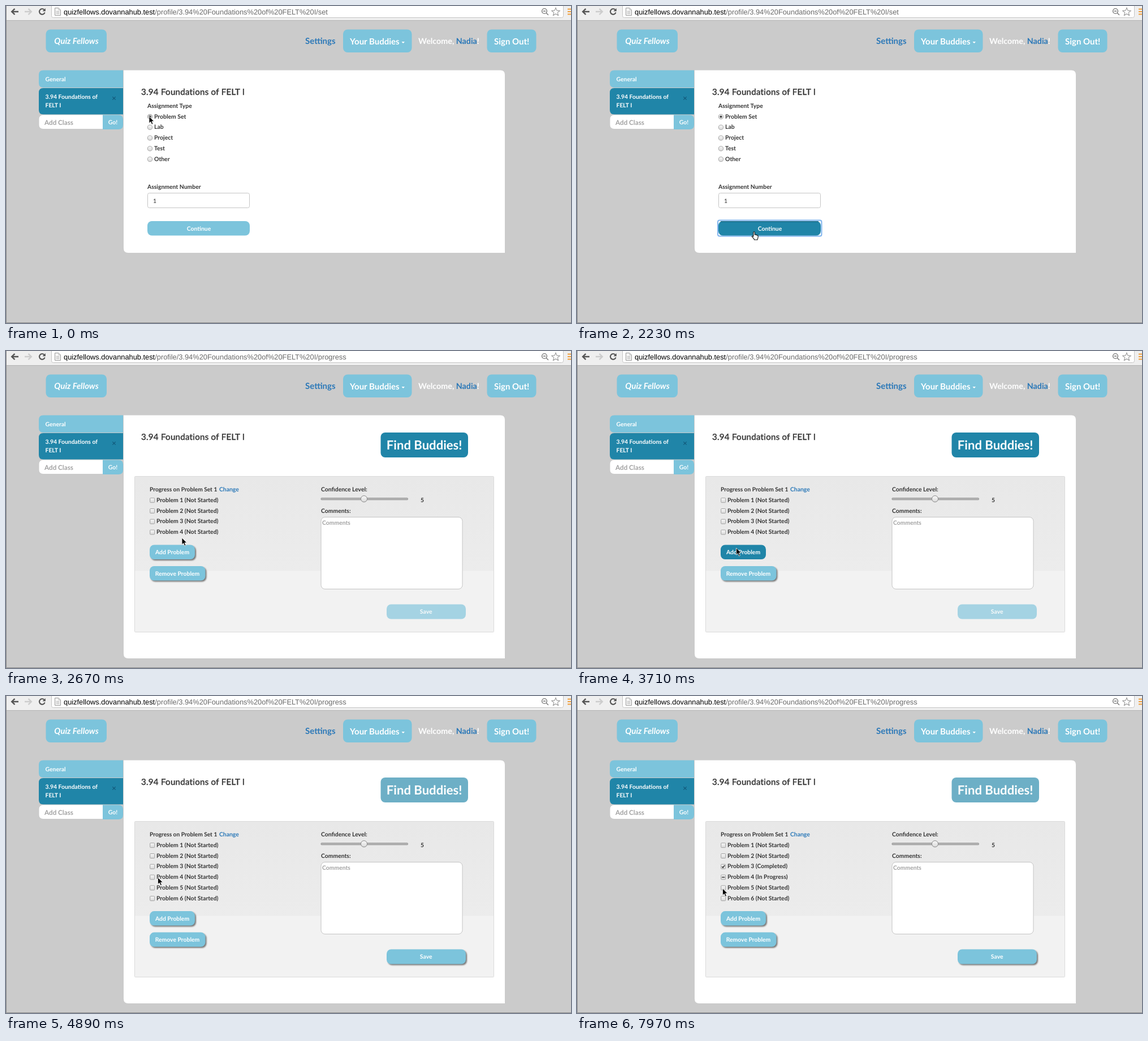
An HTML page for the animation above (8000 ms loop, 999x560 px).

```html
<!DOCTYPE html>
<html lang="en">
<head>
<meta charset="utf-8">
<title>Study planner</title>
<style>
  html, body { margin: 0; width: 100%; height: 100%; overflow: hidden; background: #cbcbcb; }
  svg { display: block; width: 999px; height: 560px; }
  text { font: 700 10.4px Lato, "Open Sans", sans-serif; fill: #333; text-rendering: geometricPrecision; white-space: pre; }
  .url { font: 12.83px "Liberation Sans", Arial, sans-serif; fill: #6a6a6a; }
  .url .host { fill: #000; }
  .nav text { font-size: 15px; }
  .nav .hello { font-size: 14.3px; }
  .nav .logo { font-size: 14.8px; font-style: italic; }
  .title { font-size: 15px; font-weight: 400; letter-spacing: .3px; stroke: #333; stroke-width: .45px; }
  .find text { font-size: 22.1px; }
  .heading { font-size: 10.2px; }
  .value { font-weight: 400; }
  .mid { text-anchor: middle; }
  .w, .w text { fill: #fff; }
  .link { fill: #2a78b8; }
  .hint { fill: #a2a2a2; }
  .light { fill: #7cc4dc; }
  .dark, .hot .light { fill: #2085a8; }
  .field { fill: #fff; stroke: #c4c4c4; }
  .lift { filter: drop-shadow(2.5px 2.5px 1px rgba(0, 0, 0, .5)); }
  .off { opacity: .65; }

  .loading-only, .progress-only, .stop, .hand, .ring { display: none; }
  .loading .loading-only, .progress .progress-only, .stopping .stop,
  .pointing .hand, .pressing .ring { display: inline; }
  .progress .form, .loading .continue, .stopping .reload, .pointing .arrow { display: none; }
  .loading .content { transform: translateY(40px); }
  .loading .links { transform: translateX(-5.7px); }
  .loading .sign rect { x: 845px; width: 92.5px; }
  .loading .sign text { transform: translateX(-3px); }
</style>
</head>
<body>
<svg id="stage" viewBox="0 0 999 560">
  <defs>
    <linearGradient id="knob" x2="0" y2="1"><stop stop-color="#f8f8f8"/><stop offset="1" stop-color="#d9d9d9"/></linearGradient>
    <linearGradient id="band" x2="0" y2="1"><stop stop-color="#e8e8e8"/><stop offset="1" stop-color="#ececec"/></linearGradient>
  </defs>
  <rect width="999" height="560" fill="#cbcbcb"/>

  <!-- browser bar -->
  <rect width="999" height="25" fill="#efefef"/>
  <path d="M0 25.5H999" stroke="#b5b5b5"/>
  <rect x="80.5" y="-9.5" width="905" height="30" rx="3" class="field"/>
  <g fill="none" stroke="#555" stroke-width="2.4">
    <path d="M22 10H11M15.5 4.8L10.2 10 15.5 15.2"/>
    <path d="M33 10H44M39.5 4.8L44.8 10 39.5 15.2" stroke="#cdcdcd"/>
    <g class="reload">
      <path d="M67.6 6.7A4.9 4.9 0 1 0 68.6 11.4" stroke-width="2.1"/>
      <path d="M69.8 4V9.3H64.5Z" fill="#555" stroke="none"/>
    </g>
    <path class="stop" d="M59.5 5.5L68.5 14.5M68.5 5.5L59.5 14.5"/>
    <g stroke="#999" stroke-width="1">
      <path d="M86.5 3.5H93L96.5 7V16.5H86.5Z" fill="#f6f6f6"/>
      <path d="M93 3.5V7H96.5M88.5 9.5H94.5M88.5 11.5H94.5M88.5 13.5H94.5" stroke="#bbb"/>
    </g>
    <g stroke="#777" stroke-width="1.4">
      <circle cx="952" cy="9" r="4.4"/>
      <path d="M949.8 9H954.2M955.2 12.2L959 16"/>
      <path d="M972 3.2L974 7.9 979.2 8.4 975.3 11.7 976.5 16.6 972 14 967.5 16.6 968.7 11.7 964.8 8.4 970 7.9Z" stroke="#999" stroke-width="1.1"/>
    </g>
    <path d="M993 5.5H999M993 10H999M993 14.5H999" stroke="#f2a03c" stroke-width="2.2"/>
  </g>
  <text class="url" x="102" y="15"><tspan class="host">quizfellows.dovannahub.test</tspan>/profile/3.94%20Foundations%20of%20FELT%20I/<tspan id="path">set</tspan></text>
  <path d="M.5 0V559.5H999" fill="none" stroke="#8a8a8a"/>

  <g class="nav">
    <rect class="light" x="70.5" y="41.5" width="107.5" height="40.5" rx="8"/>
    <text class="logo w mid" x="124.5" y="67">Quiz Fellows</text>
    <g class="links">
      <text class="link" x="529" y="67">Settings</text>
      <rect class="light" x="596" y="41.5" width="121.5" height="40.5" rx="8"/>
      <text class="w" x="608" y="68">Your Buddies</text>
      <path d="M699.5 63H705L702.2 66Z" fill="#fff"/>
      <text class="hello w" x="729" y="67">Welcome, <tspan class="link">Nadia</tspan>!</text>
    </g>
    <g class="sign">
      <rect class="light" x="850.5" y="41.5" width="87" height="40.5" rx="8"/>
      <text class="w" x="863" y="68">Sign Out!</text>
    </g>
    <g class="loading-only off">
      <rect class="light" x="845" y="82" width="92.5" height="40.5" rx="8"/>
      <text class="w dots" x="857" y="108"></text>
    </g>
  </g>

  <g class="content">
    <!-- sidebar -->
    <path class="light" d="M207 113.5V144H66Q58 144 58 136V121.5Q58 113.5 66 113.5Z"/>
    <text class="w" x="69.5" y="132.5">General</text>
    <path class="dark" d="M207 145V191.5H66Q58 191.5 58 183.5V153Q58 145 66 145Z"/>
    <text class="w" x="69.5" y="164">3.94 Foundations of</text>
    <text class="w" x="69.5" y="179">FELT I</text>
    <path d="M188.3 160.3L193.7 165.7M193.7 160.3L188.3 165.7" stroke="#12597a" stroke-width="1.2"/>
    <path d="M171 192.5V217H66Q58.5 217 58.5 210V200Q58.5 192.5 66 192.5Z" fill="#fff"/>
    <text class="hint" x="68" y="209.5" style="font-size:11.7px">Add Class</text>
    <path class="light" d="M171 192.5H199Q207 192.5 207 200.5V210Q207 218 199 218H171Z"/>
    <text class="w mid" x="189" y="208.5">Go!</text>

    <path id="panel" fill="#fff"/>
    <text class="title" x="239" y="157">3.94 Foundations of FELT I</text>

    <g class="form">
      <text x="250" y="179.5">Assignment Type</text>
      <g id="radios"></g>
      <text x="250" y="323">Assignment Number</text>
      <rect class="field" x="250.5" y="330.5" width="180" height="26" rx="3"/>
      <text class="value" x="260" y="347.5">1</text>
      <g class="continue" id="continue">
        <rect class="ring" x="249" y="378.5" width="183.5" height="28" rx="3" fill="#fff" stroke="#7fb4ee" stroke-width="2"/>
        <rect class="light" x="250" y="380" width="181" height="25.5" rx="8"/>
        <path class="ring" d="M254 381Q256 380.7 258 380.7H423Q425 380.7 427 381" fill="none" stroke="#186a87" stroke-width="1.6"/>
        <text class="w mid" x="341" y="396.5">Continue</text>
      </g>
      <g class="loading-only">
        <rect x="250" y="380" width="181" height="25.5" rx="8" fill="#a9c9d6"/>
        <text class="dots" x="260" y="397" style="fill:#e6eef2"></text>
      </g>
    </g>

    <g class="progress-only">
      <g class="find" id="find">
        <rect class="dark" x="662.5" y="144" width="154.5" height="44" rx="8"/>
        <text class="w mid" x="739.7" y="174">Find Buddies!</text>
      </g>
      <rect x="227.5" y="221.5" width="635" height="275" rx="1" fill="#f2f2f2" stroke="#dadada"/>
      <rect x="228" y="222" width="634" height="166.5" fill="url(#band)"/>
      <text class="heading" x="254" y="248">Progress on Problem Set 1</text>
      <text class="link" x="377" y="248">Change</text>
      <g id="problems"></g>
      <g class="lift" id="add">
        <rect class="light" x="254" y="342.5" width="80" height="25.5" rx="8"/>
        <text class="w mid" x="294" y="359">Add Problem</text>
      </g>
      <g class="lift" id="remove">
        <rect class="light" x="254" y="380" width="98.5" height="25.5" rx="8"/>
        <text class="w mid" x="303" y="396.5">Remove Problem</text>
      </g>
      <text x="557" y="248">Confidence Level:</text>
      <rect x="557" y="259.7" width="153.5" height="3.2" rx="1" fill="#b4b4b4" stroke="#8c8c8c" stroke-width=".8"/>
      <circle cx="633" cy="261.2" r="5.6" fill="url(#knob)" stroke="#8a8a8a"/>
      <text x="733" y="267">5</text>
      <text x="557" y="285.5">Comments:</text>
      <rect class="field" x="557" y="293.5" width="250" height="127" rx="7"/>
      <text class="hint" x="559" y="307">Comments</text>
      <g id="save">
        <rect class="light" x="673" y="447.5" width="140" height="26" rx="8"/>
        <text class="w mid" x="742.7" y="464">Save</text>
      </g>
    </g>
  </g>

  <g id="cursor">
    <path class="arrow" d="M0 0V12.2L2.8 9.5 4.8 14.2 6.9 13.3 5 8.8H8.8Z" stroke="#fff" stroke-width=".8"/>
    <path class="hand" transform="translate(-3.8 .5)" d="M3.2 8.5V1.4a1.2 1.2 0 0 1 2.4 0V5.5q1.9-.8 2.1.5 1.7-.6 2 .6 1.7-.3 1.7 1V10q0 2-1 3.2V14.5H4.6V13.4L.9 9.2q-.6-1.4.8-1.5Z" fill="#fff" stroke="#111" stroke-width="1.1"/>
  </g>
</svg>
<script>
  const LOOP = 8000, ROW = 18.8;
  const $ = id => document.getElementById(id);
  const stage = $('stage');

  // Moments at which the page reacts
  const RELEASE = 600, HOVER = 1930, PRESS = 2230, LOAD = 2370, DOTS = 2520, READY = 2670;
  const ADD_FIRST = 3860, ADD_SECOND = 4590;

  // Pointer tip: time, x, y
  const track = [
    [0, 253, 195], [600, 255, 197], [750, 257, 198.5], [900, 258, 199],
    [1340, 263, 212], [1490, 280, 255], [1640, 298, 315], [1780, 308, 362],
    [1930, 311, 388], [2080, 312.5, 398], [2370, 312, 396], [2520, 310.5, 389.5],
    [2670, 311, 330], [2820, 310, 272], [3120, 303, 300], [3270, 288, 338],
    [3410, 281.5, 348], [4000, 282, 360], [4150, 283, 371], [4740, 278, 345],
    [4890, 268.5, 320.5], [5040, 262, 311], [5190, 259, 304], [5340, 258, 302],
    [6510, 258, 308], [6650, 258, 322], [6800, 258, 333], [6950, 258, 339],
    [7090, 258, 330], [7240, 258, 321], [7830, 258, 332], [7970, 257.5, 340]
  ];

  $('radios').innerHTML = ['Problem Set', 'Lab', 'Project', 'Test', 'Other'].map((name, i) => {
    const y = 195 + ROW * i;
    return `<circle cx="254.5" cy="${y + .5}" r="4.1" fill="url(#knob)" stroke="#9a9a9a" stroke-width=".9"/>
      <text x="262" y="${y + 3.5}">${name}</text>`;
  }).join('') + '<circle cx="254.5" cy="195.5" r="2" fill="#444"/>';
  const firstRadio = $('radios').querySelector('circle');

  $('problems').innerHTML = Array.from({ length: 6 }, (_, i) => {
    const y = 263 + ROW * i;
    return `<g><rect x="254.7" y="${y - 3.3}" width="8" height="8" rx="1" fill="url(#knob)" stroke="#9a9a9a" stroke-width=".9"/>
      <path transform="translate(258.7 ${y + .7})" fill="none" stroke="#333" stroke-width="1.5"/>
      <text x="266" y="${y + 3.7}"></text></g>`;
  }).join('');
  const problems = [...$('problems').children];

  const marks = { 'Not Started': '', 'In Progress': 'M-2.6 0H2.6', 'Completed': 'M-2.4 0L-.7 1.9 2.5-2.4' };
  const within = (t, from, to) => t >= from && t < to;
  const toggle = (el, flags) => Object.entries(flags).forEach(([name, on]) => el.classList.toggle(name, on));

  function status(i, t) {
    if (i === 2 && t >= 6360) return 'Completed';
    if (i === 2 && t >= 5620 || i === 3 && t >= 7680) return 'In Progress';
    return 'Not Started';
  }

  function render(t) {
    const progress = t >= READY, edited = t >= ADD_FIRST;
    toggle(stage, {
      progress,
      loading: within(t, LOAD, READY),
      stopping: within(t, LOAD, DOTS),
      pointing: within(t, HOVER, READY),
      pressing: within(t, PRESS, LOAD)
    });
    $('path').textContent = t < LOAD ? 'set' : 'progress';
    document.querySelectorAll('.dots').forEach(el => el.textContent = t < DOTS ? 'Loading' : 'Loading.');

    const bottom = progress ? 543 : 436;
    $('panel').setAttribute('d', `M208 113.5H874Q882 113.5 882 121.5V${bottom}H216Q208 ${bottom} 208 ${bottom - 8}Z`);

    firstRadio.setAttribute('fill', t < RELEASE ? '#cfcfcf' : 'url(#knob)');
    toggle($('continue'), { hot: t >= HOVER });

    const count = 4 + edited + (t >= ADD_SECOND);
    problems.forEach((row, i) => {
      const state = status(i, t);
      row.style.display = i < count ? '' : 'none';
      row.querySelector('path').setAttribute('d', marks[state]);
      row.querySelector('text').textContent = `Problem ${i + 1} (${state})`;
    });

    const shift = `translate(0 ${ROW * (count - 4)})`;
    $('add').setAttribute('transform', shift);
    $('remove').setAttribute('transform', shift);
    toggle($('add'), {
      hot: within(t, 3270, ADD_FIRST) || within(t, 4150, ADD_SECOND),
      lift: !within(t, 3710, ADD_FIRST) && !within(t, 4440, ADD_SECOND)
    });
    toggle($('find'), { off: edited });
    toggle($('save'), { off: !edited, lift: edited });

    const [, x, y] = track.filter(p => p[0] <= t).pop();
    $('cursor').setAttribute('transform', `translate(${x} ${y})`);
  }

  const start = performance.now();
  function tick(now) {
    render(Math.max(0, now - start) % LOOP);
    requestAnimationFrame(tick);
  }
  render(0);
  requestAnimationFrame(tick);
</script>
</body>
</html>
```
